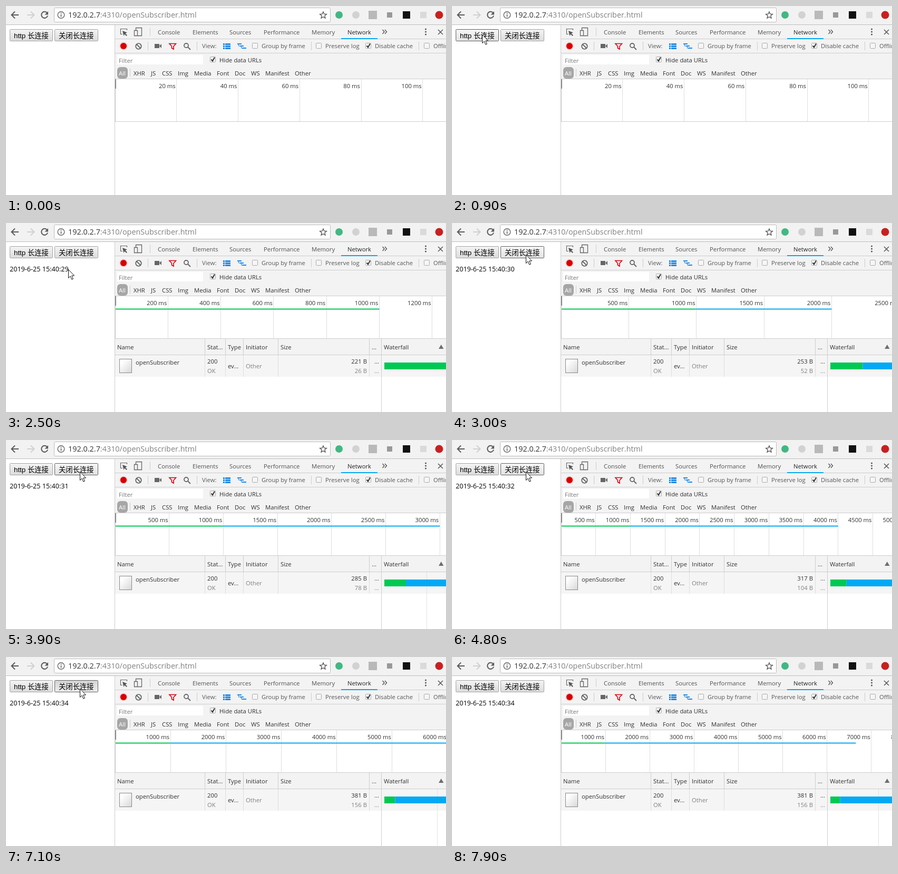
An HTML page that plays this animation: 835x359 px, repeating every 8500 ms.

```html
<!DOCTYPE html>
<html lang="en">
<head>
<meta charset="utf-8">
<title>Network panel</title>
<style>
  html, body { margin: 0; width: 100%; height: 100%; overflow: hidden; background: #fff; }
  svg { display: block; width: 835px; height: 359px; }
  text { font: 11.3px "Open Sans", "Noto Sans", sans-serif; white-space: pre; }
  .button { font: 13.33px "Liberation Sans", "Noto Sans CJK SC", "Noto Sans CJK", sans-serif; }
  .url { font-size: 14.4px; }
  .clock { font-size: 12.6px; }
</style>
</head>
<body>
<svg id="stage" viewBox="0 0 835 359">
  <defs>
    <linearGradient id="idle" x2="0" y2="1"><stop stop-color="#f4f4f4"/><stop offset="1" stop-color="#dcdcdc"/></linearGradient>
    <linearGradient id="hover" x2="0" y2="1"><stop stop-color="#f7f7f7"/><stop offset="1" stop-color="#e2e2e2"/></linearGradient>
    <linearGradient id="pressed" x2="0" y2="1"><stop stop-color="#d4d4d4"/><stop offset="1" stop-color="#ececec"/></linearGradient>
    <linearGradient id="paper" x2="1" y2="1"><stop offset=".2" stop-color="#fff"/><stop offset="1" stop-color="#d8d8d8"/></linearGradient>
  </defs>
  <g id="chrome"></g>
  <g id="live"></g>
  <path id="cursor" stroke="#111"/>
</svg>
<script>
const LOOP = 8500, TICK = 100;
const GREEN = '#00c853', BLUE = '#03a9f4', ICON_BLUE = '#1e88e5';
const LINE = '#cdcdcd', PANEL = '#f3f3f3', GREY = '#808080', INK = '#303030';
const PLOT_X = 207, FALL_X = 718;
const ARROW = 'M.5 .5V16.5L4.2 13 6.8 19.2 9.4 18.1 6.8 12H11.6Z';
const I_BEAM = 'M-3 -7.500H-1L.5 -6.500 2 -7.500H4M.5 -6.500V6.500M-3 7.500H-1L.5 6.500 2 7.500H4';
const $ = id => document.getElementById(id);

const rect = (x, y, w, h, fill, extra = '') =>
  `<rect x="${x}" y="${y}" width="${w}" height="${h}" fill="${fill}" ${extra}/>`;
const box = (x, y, w, h, fill, stroke, r = 0) =>
  rect(x + .5, y + .5, w - 1, h - 1, fill, `stroke="${stroke}" rx="${r}"`);
const circle = (x, y, r, fill, extra = '') => `<circle cx="${x}" cy="${y}" r="${r}" fill="${fill}" ${extra}/>`;
const stroke = (d, color, width = 1) => `<path d="${d}" fill="none" stroke="${color}" stroke-width="${width}"/>`;
const fill = (d, color) => `<path d="${d}" fill="${color}"/>`;
const text = (x, y, s, color = INK, extra = '') => `<text x="${x}" y="${y}" fill="${color}" ${extra}>${s}</text>`;
const textEnd = (x, y, s, color) => text(x, y, s, color, 'text-anchor="end"');
const checkbox = (x, y, on) => box(x, y, 11, 11, '#f6f6f6', '#aaa', 1) +
  (on ? stroke(`M${x + 2.5} ${y + 5.5}l2.5 3 4-7`, '#333', 2) : '');

function browserBar() {
  return rect(0, 0, 835, 35, '#f2f2f2') + rect(0, 35, 835, 1, '#bdbdbd') +
    stroke('M24 17H11M17 10.5L10.5 17 17 23.5', '#5a5a5a', 2) +
    stroke('M40 17H53M47 10.5L53.5 17 47 23.5', '#d0d0d0', 2) +
    stroke('M78 13.2A6 6 0 1 0 79 18.5', '#5a5a5a', 2) + fill('M80 10v6.5h-6.5z', '#5a5a5a') +
    box(91, 3, 525, 28, '#fff', '#bcbcbc', 2) +
    circle(104.5, 17, 6.3, 'none', 'stroke="#666" stroke-width="1.4"') +
    rect(103.7, 16, 1.7, 4.5, '#666') + rect(103.7, 13, 1.7, 1.7, '#666') +
    `<text class="url" x="118" y="22" fill="#333">192.0.2.7<tspan fill="#808080">:4310/openSubscriber.html</tspan></text>` +
    stroke('M602 11l1.8 4.2 4.5.4-3.4 3 1 4.4-3.9-2.3-3.9 2.3 1-4.4-3.4-3 4.5-.4z', '#555', 1.4) +
    circle(632, 17, 7, '#41b883') + circle(664, 17, 7, '#d2d2d2') + rect(688, 9, 16, 16, '#b9b9b9') +
    rect(723, 12, 10, 10, '#999') + rect(753, 10, 14, 14, '#111') + rect(786, 11, 12, 12, '#dadada') +
    circle(822, 17, 7.5, '#c9201f');
}

function tabBar() {
  const tabs = [[288, 'Console'], [354, 'Elements'], [424, 'Sources'], [489, 'Performance'], [580, 'Memory'], [648, 'Network']];
  return rect(206, 36, 629, 103, PANEL) + rect(206, 36, 1, 323, LINE) +
    stroke('M221 53.500H217.500V43.500H229.500V46', '#666', 1.2) + fill('M221 47l9 3.500-3.500 1.500 3.500 3.500-1.500 1.500-3.500-3.500-1.500 3.500z', '#555') +
    stroke('M246.500 46V41.500H257.500V56.500H250M243.500 46.500H249.500V56.500H243.500Z', '#666', 1.3) +
    rect(273, 41, 1, 16, LINE) + tabs.map(([x, s]) => text(x, 54, s, s === 'Network' ? '#222' : '#505050')).join('') +
    stroke('M714.500 45l3.500 4-3.500 4M719 45l3.500 4-3.500 4', '#555', 1.4) +
    [44, 49, 54].map(y => circle(796.5, y, 1.5, '#555')).join('') +
    stroke('M820 45l9 9M829 45l-9 9', '#555', 1.5) +
    rect(206, 62, 629, 1, LINE) + rect(636, 61, 69, 2, BLUE);
}

function toolBar() {
  const separators = [269, 362, 579, 783].map(x => rect(x, 68, 1, 16, LINE)).join('');
  const checks = [[467, 'Group by frame', 0], [588, 'Preserve log', 0], [682, 'Disable cache', 1], [793, 'Offline', 0]];
  return separators + circle(223, 76, 7.5, '#f3c9c9') + circle(223, 76, 6, '#d80000') +
    circle(251.5, 76.5, 5.3, 'none', 'stroke="#666" stroke-width="1.8"') + stroke('M248 73l7 7', '#666', 1.8) +
    rect(282, 72, 9, 8, '#666') + fill('M291 76l4-4v8z', '#666') +
    stroke('M310 71.500H322.500L318 76.500V82L314.500 80V76.500Z', '#d8000c', 1.6) +
    circle(342, 75, 4, 'none', 'stroke="#666" stroke-width="1.8"') + stroke('M345 78l5 5', '#666', 2) +
    text(372, 80, 'View:', '#5a5a5a') +
    [71, 75, 79].map(y => rect(412, y, 3, 3, ICON_BLUE) + rect(416, y, 10, 3, ICON_BLUE)).join('') +
    rect(439, 71, 8, 2, ICON_BLUE) + rect(444, 75, 7, 2, ICON_BLUE) + rect(448, 79, 8, 2, ICON_BLUE) +
    stroke('M441.500 73v3h3M446.500 77v3h2', ICON_BLUE) +
    checks.map(([x, s, on]) => checkbox(x, 70, on) + text(x + 18, 80, s, '#555')).join('') +
    rect(206, 89, 629, 1, LINE);
}

function filterBar() {
  const types = [[242, 'XHR'], [275, 'JS'], [296, 'CSS'], [326, 'Img'], [357, 'Media'], [400, 'Font'],
    [434, 'Doc'], [465, 'WS'], [492, 'Manifest'], [548, 'Other']];
  return rect(211, 93, 163, 18, '#fff') + text(214, 108, 'Filter', '#777') +
    checkbox(387, 96, true) + text(405, 107, 'Hide data URLs') +
    rect(211, 116, 20, 22, '#a6a6a6', 'rx="6"') + text(214, 132, 'All', '#fff') + rect(235, 119, 1, 15, LINE) +
    types.map(([x, s]) => text(x, 132, s)).join('') +
    rect(207, 138, 628, 1, LINE) + rect(207, 219, 628, 1, LINE) + rect(207, 139, 1, 80, LINE);
}

// Smallest 1-2-5 step, in seconds, whose grid lines stay at least 64 px apart.
function gridStep(pxPerSecond) {
  for (let unit = .001; ; unit *= 10)
    for (const k of [1, 2, 5]) if (k * unit * pxPerSecond >= 64) return k * unit;
}

function overview(scale, elapsed) {
  const step = gridStep(scale);
  let out = '';
  for (let i = 1, x; (x = PLOT_X + i * step * scale) < 900; i++)
    out += rect(Math.floor(x), 139, 1, 80, '#dedede') + textEnd(x - 2, 156, Math.round(i * step * 1000) + ' ms');
  if (elapsed) {
    const split = PLOT_X + .995 * scale;
    out += rect(208, 162.500, split - 208, 2, GREEN) +
      rect(split, 162.500, Math.max(0, PLOT_X + elapsed * scale - split), 2, BLUE);
  }
  return out + rect(207, 139, 2, 18, '#8a8a8a');
}

function table(count, elapsed) {
  const heads = [[211, 'Name'], [382, 'Stat...'], [421, 'Type'], [455, 'Initiator'], [521, 'Size'], [694, '...'], [717, 'Waterfall']];
  let out = rect(207, 220, 628, 30, PANEL) + rect(207, 250, 628, 1, LINE) + rect(207, 251, 628, 41, '#f5f5f5') +
    heads.map(([x, s]) => text(x, 240, s)).join('') + fill('M821 239h9.500l-4.750-8z', '#6e6e6e');
  const pxPerSecond = 120.5 / elapsed;
  if (elapsed) {
    const gridX = FALL_X + gridStep(pxPerSecond) * pxPerSecond;
    if (gridX < 835) out += rect(Math.round(gridX), 251, 1, 108, '#e2e2e2');
  }
  out += [377, 416, 450, 516, 689].map(x => rect(x, 220, 1, 30, LINE) + rect(x, 251, 1, 41, '#dedede')).join('') +
    rect(712, 220, 1, 139, LINE) + box(215, 258, 24, 27, 'url(#paper)', '#888') +
    text(246, 269, 'openSubscriber') + text(455, 276, 'Other', GREY);
  if (!elapsed)
    return out + text(382, 276, '(pe...', GREY) + text(699, 276, '...', GREY) +
      textEnd(685, 267, '0 B') + textEnd(685, 285, '0 B', GREY);
  const split = FALL_X + 1.02 * pxPerSecond;
  return out + text(382, 267, '200') + text(382, 285, 'OK', GREY) + text(421, 276, 'ev...') +
    textEnd(685, 267, `${189 + 32 * count} B`) + textEnd(685, 285, `${26 * count} B`, GREY) +
    text(699, 267, '...') + text(699, 285, '...', GREY) +
    rect(FALL_X, 265, split - FALL_X, 13, GREEN) + rect(split, 265, 835 - split, 13, BLUE);
}

const BUTTON_EDGE = { idle: '#a3a3a3', hover: '#5e5e5e', pressed: '#5e5e5e' };
const button = (x, w, label, state) => box(x, 44, w, 23, `url(#${state})`, BUTTON_EDGE[state], 1) +
  text(x + 8, 61, label, '#000', 'class="button"');

// Time, seconds elapsed, zoom-out level of the overview.
const UPDATES = [[2100, 1, 11], [3000, 2, 14], [3900, 3, 15], [4800, 4, 17], [5700, 5, 18], [6600, 6, 18], [7200, 6.65, 19]];
const MESSAGES = [2000, 3000, 3900, 4800, 5700, 6600];
// Time and tip of the pointer.
const PATH = [[100, 563, 212], [200, 392, 252], [300, 222, 190], [400, 157, 133], [500, 95, 95], [600, 76, 78],
  [700, 63, 63], [900, 57, 54], [1000, 55, 58], [2100, 55, 58], [2300, 78, 82], [2500, 118, 88], [2700, 137, 72],
  [2800, 140, 60], [7400, 140, 60], [7500, 190, 88], [7600, 330, 98], [7700, 560, 132], [7800, 815, 118]];

function pointerAt(t) {
  const i = PATH.findIndex(p => p[0] >= t);
  if (i < 0 || t < PATH[0][0]) return null;
  const [t1, x1, y1] = PATH[i], [t0, x0, y0] = PATH[Math.max(0, i - 1)];
  const k = t1 > t0 ? (t - t0) / (t1 - t0) : 1;
  return { x: Math.round(x0 + (x1 - x0) * k), y: Math.round(y0 + (y1 - y0) * k) };
}

function buttonState(pointer, x, w, pressed) {
  const over = pointer && pointer.x >= x && pointer.x < x + w && pointer.y >= 44 && pointer.y < 67;
  return over ? (pressed ? 'pressed' : 'hover') : 'idle';
}

function drawPointer(pointer) {
  const cursor = $('cursor');
  cursor.style.display = pointer ? '' : 'none';
  if (!pointer) return;
  const overPlot = pointer.x > PLOT_X && pointer.y > 139;
  cursor.setAttribute('d', overPlot ? I_BEAM : ARROW);
  cursor.setAttribute('fill', overPlot ? 'none' : '#fff');
  cursor.setAttribute('transform', `translate(${pointer.x} ${pointer.y})`);
}

function draw(t) {
  const pointer = pointerAt(t);
  const [, elapsed, zoom] = UPDATES.filter(u => u[0] <= t).pop() || [0, 0, 0];
  const count = MESSAGES.filter(m => m <= t).length;
  $('live').innerHTML =
    button(7, 82, 'http 长连接', buttonState(pointer, 7, 82, t === 1000)) +
    button(92, 83, '关闭长连接', buttonState(pointer, 92, 83, t === 7100)) +
    (count ? text(7, 92, `2019-6-25 15:40:${28 + count}`, '#000', 'class="clock"') : '') +
    overview(5837.5 / 1.25 ** zoom, elapsed) +
    (t >= 1100 ? table(count, elapsed) : '');
  drawPointer(pointer);
}

$('chrome').innerHTML = browserBar() + tabBar() + toolBar() + filterBar();
const start = performance.now();
let shown = -1;
function frame() {
  const t = Math.floor((performance.now() - start) % LOOP / TICK) * TICK;
  if (t !== shown) draw(shown = t);
  requestAnimationFrame(frame);
}
frame();
</script>
</body>
</html>
```
